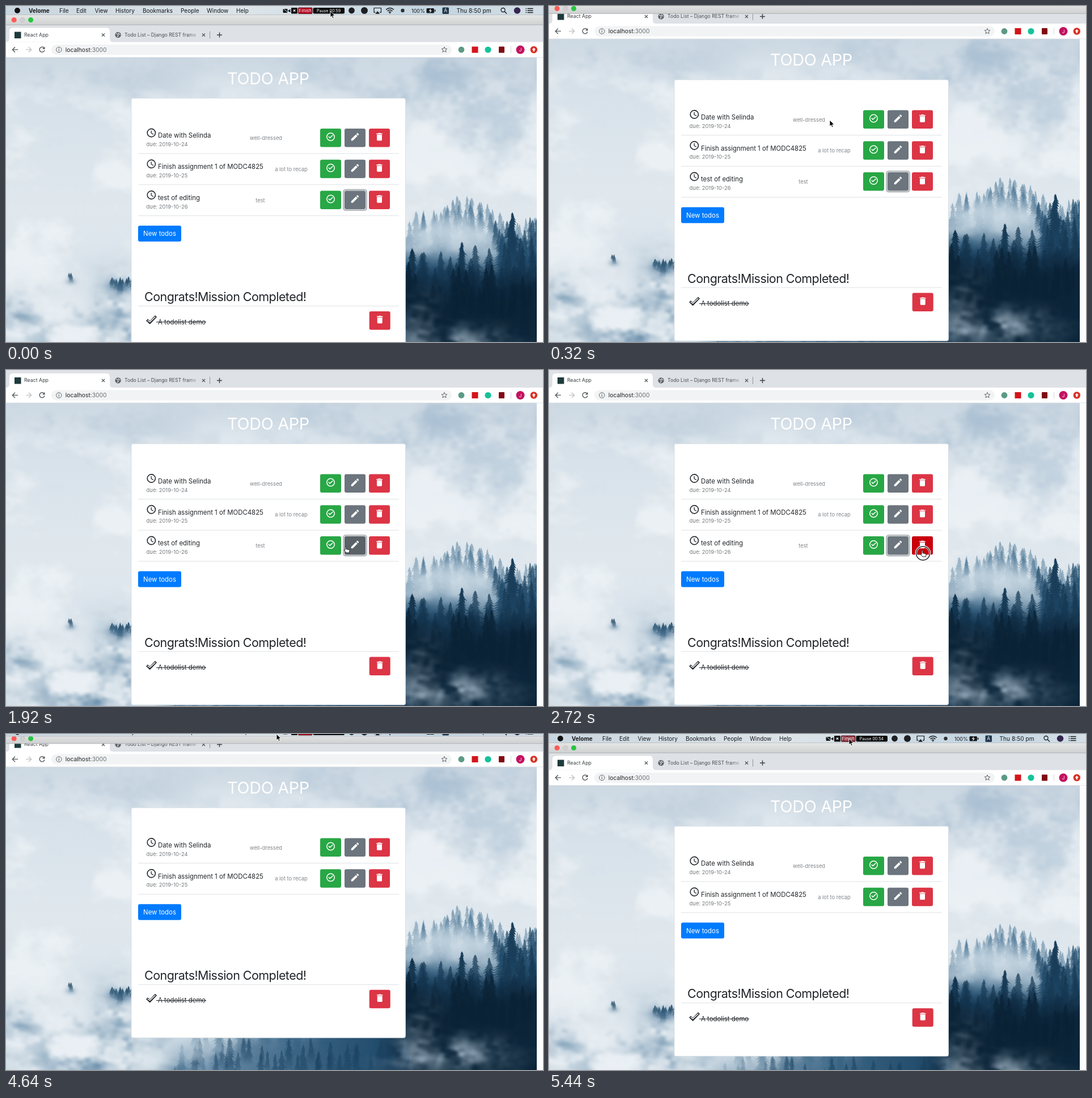
Write an HTML page with a canvas that moves like this. It is 947 px wide and 592 px high and loops after 5600 ms.

```html
<!DOCTYPE html>
<html lang="en">
<head>
<meta charset="utf-8">
<title>Todo app</title>
<style>
  html, body { margin: 0; width: 100%; height: 100%; overflow: hidden; background: #fff; }
  #stage { position: relative; width: 947px; height: 592px; overflow: hidden; background: #dee1e6; }
  #win, #stage svg, canvas { position: absolute; left: 0; top: 0; }
  #win { width: 947px; height: 592px; }
  canvas { top: 58px; }
  svg { display: block; font-family: Inter, "Open Sans", sans-serif; }
  text { white-space: pre; }
</style>
</head>
<body>
<div id="stage">
  <div id="win">
    <canvas id="scene" width="936" height="534"></canvas>
    <svg id="page" width="947" height="592"></svg>
  </div>
  <svg id="top" width="947" height="592"></svg>
</div>
<script>
const $ = id => document.getElementById(id);
const clamp = v => Math.max(0, Math.min(1, v));
const smooth = (v, a, b) => { const k = clamp((v - a) / (b - a)); return k * k * (3 - 2 * k); };

// ---------- misty forest ----------
const W = 936, H = 534, TOP = 58;
const ctx = $('scene').getContext('2d');
let seed = 11;
const rnd = () => (seed = (seed * 16807) % 2147483647) / 2147483647;

const hash = (x, y) => { const v = Math.sin(x * 127.1 + y * 311.7) * 43758.5453; return v - Math.floor(v); };
function noise(x, y) {
  const i = Math.floor(x), j = Math.floor(y);
  const u = smooth(x - i, 0, 1), v = smooth(y - j, 0, 1);
  const a = hash(i, j), b = hash(i + 1, j), c = hash(i, j + 1), d = hash(i + 1, j + 1);
  return a + (b - a) * u + (c - a) * v + (a - b - c + d) * u * v;
}
const fbm = (x, y) => noise(x, y) * .46 + noise(x * 2 + 7, y * 2) * .27 + noise(x * 4, y * 4 + 3) * .16 + noise(x * 9, y * 9) * .11;
const blob = (x, y, cx, cy, rx, ry) => Math.exp(-(((x - cx) / rx) ** 2) - ((y - cy) / ry) ** 2);

// Paints one colour whose alpha comes from alpha(x, y, noise)
function mist(rgb, shift, alpha) {
  const c = document.createElement('canvas');
  c.width = W / 2; c.height = H / 2;
  const g = c.getContext('2d'), img = g.createImageData(c.width, c.height);
  for (let j = 0, p = 0; j < c.height; j++) for (let i = 0; i < c.width; i++, p += 4) {
    const x = i * 2, y = j * 2 + TOP;
    const f = fbm(x / 100 + shift + y / 300, y / 75 - x / 350 + shift);
    img.data.set(rgb, p);
    img.data[p + 3] = 255 * clamp(alpha(x, y, f));
  }
  g.putImageData(img, 0, 0);
  ctx.drawImage(c, 0, TOP, W, H);
}

// A ragged fir that fades into the fog at its foot
function tree(x, y, h, w, rgb, a = 1) {
  const g = ctx.createLinearGradient(0, y, 0, y + h);
  g.addColorStop(0, `rgba(${rgb},${a})`);
  g.addColorStop(.5, `rgba(${rgb},${a * .9})`);
  g.addColorStop(1, `rgba(${rgb},0)`);
  ctx.fillStyle = g;
  ctx.beginPath();
  ctx.moveTo(x, y);
  const n = Math.max(4, Math.round(h / 4.5));
  for (const side of [1, -1]) {
    for (let i = 1; i <= n; i++) {
      const k = side > 0 ? i / n : 1 - (i - 1) / n;
      const r = w * (.04 + k ** .7) * (.45 + rnd() * .75);
      const out = [x + side * r, y + h * k + 1], inn = [x + side * r * .45, y + h * k - 1];
      for (const p of side > 0 ? [out, inn] : [inn, out]) ctx.lineTo(...p);
    }
  }
  ctx.fill();
}

function grove(n, x0, x1, yAt, spread, h, w, rgb, a) {
  for (let i = 0; i < n; i++) {
    const x = x0 + (x1 - x0) * (i + rnd() * 1.6) / n, s = .5 + rnd() * .8;
    tree(x, yAt(x) + (rnd() - .5) * spread, h * s, w * s, rgb, a);
  }
}

const slope = [[0, 640], [220, 585], [320, 500], [600, 400], [705, 330], [936, 325]];
function ridge(x) {
  const i = Math.max(1, slope.findIndex(p => p[0] >= x));
  const [a, b] = [slope[i - 1], slope[i]];
  return a[1] + (b[1] - a[1]) * (x - a[0]) / (b[0] - a[0]);
}
const crest = x => 343 - 36 * Math.exp(-(((x - 812) / 55) ** 2));

function paintScene() {
  ctx.translate(0, -TOP);
  const sky = ctx.createLinearGradient(0, TOP, 0, 592);
  [[0, '#cdd9e3'], [.2, '#d8e2ea'], [.5, '#e0e8ee'], [1, '#d5e0e8']].forEach(s => sky.addColorStop(...s));
  ctx.fillStyle = sky;
  ctx.fillRect(0, TOP, W, H);

  mist([150, 177, 201], 3, (x, y, f) => smooth(f, .38, .72) *
    (.7 * blob(x, y, 740, 100, 230, 65) + .5 * blob(x, y, 90, 95, 170, 60) + .35 * blob(x, y, 880, 220, 110, 60)));
  mist([238, 243, 246], 9, (x, y, f) => smooth(f, .36, .68) * .8 * smooth(y, 60, 170));

  // far slopes
  mist([88, 128, 158], 5, (x, y, f) => smooth(y + (f - .5) * 80, ridge(x) + 15, ridge(x) + 95) * .9);
  grove(26, 700, 936, crest, 22, 62, 13, '92,132,161', .6);
  grove(13, 735, 860, x => crest(x) + 6, 30, 55, 13, '66,109,141', .6);
  mist([30, 72, 104], 15, (x, y, f) => smooth(y + (f - .5) * 90, ridge(x) + 50, ridge(x) + 130) * smooth(x, 300, 700) * .95);
  grove(34, 290, 705, x => ridge(x) + 50, 70, 70, 15, '45,91,124', .5);
  mist([200, 216, 227], 21, (x, y, f) => smooth(f, .3, .65) *
    (.85 * blob(x, y, 760, 362, 85, 30) + .5 * blob(x, y, 845, 385, 40, 40)));

  // near trees
  grove(16, 860, 936, () => 362, 50, 110, 22, '32,74,105', .75);
  tree(893, 331, 120, 24, '24,60,88');
  tree(804, 383, 110, 22, '24,60,88');
  tree(716, 394, 110, 24, '18,50,75');
  grove(26, 700, 936, x => 425 - (x - 705) * .13, 50, 90, 21, '22,57,84', .75);
  mist([10, 34, 54], 27, (x, y, f) => smooth(y + (f - .5) * 70, 405, 480) * smooth(x, 640, 730) * .93);
  grove(30, 700, 936, () => 452, 70, 95, 20, '10,33,52', .75);
  grove(34, 330, 720, () => 548, 36, 60, 13, '24,63,94', .55);

  // low fog
  mist([182, 201, 215], 33, (x, y, f) => smooth(f, .38, .7) *
    (.95 * blob(x, y, 775, 565, 95, 30) + .45 * blob(x, y, 725, 505, 40, 35) + .7 * blob(x, y, 320, 560, 80, 45)));
  mist([62, 108, 144], 37, (x, y, f) => (.35 + f) * (blob(x, y, 201, 463, 20, 9) + .5 * blob(x, y, 113, 452, 9, 6)));
  grove(9, 183, 220, () => 448, 9, 22, 8, '34,74,103', .95);
  grove(3, 109, 118, () => 438, 6, 20, 6, '34,74,103', .95);
  mist([84, 126, 159], 39, (x, y, f) => smooth(f, .36, .66) *
    (.95 * blob(x, y, 205, 510, 60, 60) + .65 * blob(x, y, 25, 505, 90, 35) + .75 * blob(x, y, 140, 575, 110, 35)));
  mist([236, 241, 245], 45, (x, y, f) => smooth(f, .4, .66) *
    (.85 * blob(x, y, 80, 495, 140, 40) + .8 * blob(x, y, 30, 570, 100, 45)));
}

// ---------- svg helpers ----------
const text = (x, y, s, size, fill = '#212529', more = '') =>
  `<text x="${x}" y="${y}" font-size="${size}" fill="${fill}" ${more}>${s}</text>`;
const rect = (x, y, w, h, fill, r = 0, more = '') =>
  `<rect x="${x}" y="${y}" width="${w}" height="${h}" rx="${r}" fill="${fill}" ${more}/>`;
const dot = (x, y, r, fill, more = '') => `<circle cx="${x}" cy="${y}" r="${r}" fill="${fill}" ${more}/>`;
const line = (d, color, w = 1, more = '') => `<path d="${d}" fill="none" stroke="${color}" stroke-width="${w}" ${more}/>`;
const mid = 'text-anchor="middle"';

const glyphs = {
  clock: dot(12, 12, 9, 'none', 'stroke="#212529" stroke-width="2"') + line('M11.8 7v5.6l4.8 2.9', '#212529', 1.6),
  check: dot(12, 12, 9, 'none', 'stroke="#fff" stroke-width="2"') + line('M7 11.3l3.2 3.2L17.200 8', '#fff', 2),
  edit: '<path fill="#fff" d="M3 17.25V21h3.75L17.81 9.94l-3.75-3.75zM20.71 7.04c.39-.39.39-1.02 0-1.41l-2.34-2.34c-.39-.39-1.02-.39-1.41 0l-1.83 1.83 3.75 3.75z"/>',
  trash: '<path fill="#fff" d="M6 19c0 1.1.9 2 2 2h8c1.1 0 2-.9 2-2V7H6zM19 4h-3.5l-1-1h-5l-1 1H5v2h14z"/>'
};
const icon = (name, cx, cy, size) =>
  `<g transform="translate(${cx - size / 2} ${cy - size / 2}) scale(${size / 24})">${glyphs[name]}</g>`;
const button = (x, y, color, name, id = '') =>
  rect(x, y, 37, 32.5, color, 3, id && `id="${id}"`) + icon(name, x + 18.5, y + 14.5, 18);
const rule = y => rect(233, y, 460, 1, '#dee2e6');
const GREEN = '#28a745', GRAY = '#6c757d', RED = '#dc3545';

function row(i, title, due, note, noteX) {
  const y = 183.5 + i * 54.75, last = i === 2;
  return icon('clock', 256.3, y + 7.5, 19) +
    text(268, y + 16.3, title, 11.4) +
    text(247.6, y + 31.2, 'due: ' + due, 9.4, '#75797d') +
    text(noteX, y + 20.2, note, 9.3, '#80858a', mid) +
    (last ? rect(595.2, y - 1.8, 40.6, 36.1, 'none', 4, 'stroke="#b5babe" stroke-width="2.6"') : '') +
    button(554, y, GREEN, 'check', last ? 'done' : '') +
    button(597, y, GRAY, 'edit', last ? 'edit' : '') +
    button(640, y, RED, 'trash', last ? 'trash' : '') +
    rule(y + 43.5);
}

const cross = (x, y, r, color) => line(`M${x - r} ${y - r}l${2 * r} ${2 * r}m0 ${-2 * r}l${-2 * r} ${2 * r}`, color, 1.1);

const tabs = `
  <defs><linearGradient id="fade" gradientUnits="userSpaceOnUse" x1="322" x2="341" y1="0" y2="0">
    <stop stop-color="#4b4f54"/><stop offset="1" stop-color="#4b4f54" stop-opacity="0"/></linearGradient></defs>
  ${rect(0, 0, 947, 31, '#dee1e6')}
  <path fill="#fff" d="M0 31q6 0 6-6V12q0-6 6-6h165q6 0 6 6v13q0 6 6 6z"/>
  ${rect(15, 13, 11.5, 11.5, '#1d3a3c')}
  ${text(32, 21.4, 'React App', 8.8, '#3c4043')}${cross(171.5, 18.4, 2.6, '#4a4d51')}
  ${dot(197.6, 18.4, 5.2, '#5f6368')}
  ${line('M194 16l3 1 1 3-2 2M199 14.500l-.5 2 3 1.500', '#dee1e6', 1.2)}
  ${text(209, 21.4, 'Todo List – Django REST frame', 8.7, 'url(#fade)')}
  ${cross(348.5, 18.4, 2.6, '#4a4d51')}${rect(359, 12, 1, 13, '#92969b')}
  ${line('M376.500 14v9M372 18.500h9', '#3c4043', 1.4)}`;

const toolbar = `
  ${rect(0, 31, 947, 27, '#fff')}${rect(0, 57.5, 947, .8, '#dcdfe2')}
  ${line('M21 44.400h-9.500M16 39.700l-4.700 4.700 4.700 4.700', '#55595d', 1.4)}
  ${line('M35 44.400h9.500M40 39.700l4.700 4.700-4.700 4.700', '#bfc2c5', 1.4)}
  ${line('M67.500 41.800A4.500 4.500 0 1 0 68 45.500', '#55595d', 1.4)}<path d="M68.500 39v4.500H64z" fill="#55595d"/>
  ${rect(80, 35.5, 706, 18, '#f1f3f4', 9)}
  ${dot(93.3, 44.5, 4.7, 'none', 'stroke="#5f6368"')}${line('M93.300 43.600v3.400M93.300 41.500v1.200', '#5f6368', 1.1)}
  <text x="104.800" y="48.100" font-size="10.300" fill="#202124">localhost<tspan fill="#6b6f74">:3000</tspan></text>
  <path d="M773 39.500l1.400 3.200 3.500.3-2.700 2.300.9 3.400-3.100-1.800-3.100 1.800.9-3.400-2.700-2.300 3.500-.3z" fill="none" stroke="#5f6368"/>
  ${dot(803, 44.5, 5.4, '#5c9a86')}${rect(821.5, 39, 11, 11, '#d5141b')}
  ${dot(850, 44.5, 5.6, '#15c39a')}${rect(869, 39, 10, 11, '#800a14', 1)}
  ${rect(890, 38.5, 1, 12, '#d5d8db')}
  ${dot(907, 44.5, 7.5, '#c2125f')}${text(907, 47.5, 'J', 8.2, '#fff', mid)}
  ${dot(930.8, 44.5, 6.2, '#d93025')}<path d="M930.800 41l3.300 3.600h-2v3h-2.600v-3h-2z" fill="#fff"/>`;

$('page').innerHTML = tabs + toolbar + `
  ${rect(936, 58.3, 11, 560, '#fcfcfc')}
  ${text(462.5, 105, 'TODO APP', 28.8, '#fff', mid + ' letter-spacing="-.3"')}
  ${rect(221, 130, 483.5, 460, '#fff', 3, 'id="card" stroke="#d5dbe0" stroke-width=".8"')}
  ${row(0, 'Date with Selinda', '2019-10-24', 'well-dressed', 458.5)}
  ${row(1, 'Finish assignment 1 of MODC4825', '2019-10-25', 'a lot to recap', 503)}
  <g id="third">${row(2, 'test of editing', '2019-10-26', 'test', 448.5)}</g>
  <g id="below">
    ${rect(233, 354.5, 76, 28, '#007bff', 3)}${text(271, 372.8, 'New todos', 11.4, '#fff', mid)}
    ${text(244, 487.6, 'Congrats!Mission Completed!', 21.5, '#212529', 'letter-spacing="-.55"')}${rule(495.6)}
    ${line('M248.500 520.500l5.200 4.800L264.500 514', '#212529', 4.2)}${line('M249.600 521.400l4.100 2.700L263.400 515', '#fff', 1.5)}
    ${text(268, 528.2, 'A todolist demo', 11.4)}${rect(265, 523.8, 88, 1, '#212529')}
    ${button(640.7, 505.5, RED, 'trash')}
  </g>`;

const menus = [[94, 'File'], [124, 'Edit'], [156.5, 'View'], [193, 'History'], [241, 'Bookmarks'], [308, 'People'], [354, 'Window'], [406, 'Help']];
const INK = '#15181b';
const menuBar = `
  <linearGradient id="bar"><stop stop-color="#c9d5de"/><stop offset=".45" stop-color="#dce4e9"/><stop offset=".8" stop-color="#c3d5e1"/><stop offset="1" stop-color="#d3dee6"/></linearGradient>
  ${rect(0, -8, 947, 23.7, 'url(#bar)')}${rect(0, 15.2, 947, .6, '#a9b1b8')}
  ${dot(20, 8, 5, '#111')}
  ${text(40, 11.7, 'Velome', 10, INK, 'font-weight="700"')}
  ${menus.map(([x, s]) => text(x, 11.7, s, 10, INK)).join('')}
  ${rect(488.5, 5, 8, 7, INK, 1)}<path d="M497 8.500l4.500-3v6z" fill="${INK}"/>${line('M488.500 4l11 9.500', '#dce4e9', 1)}
  ${rect(503, 3, 11, 10.5, '#0b0b0b', 1)}${cross(508.5, 8.2, 1.7, '#fff')}
  ${rect(515.5, 3, 24.5, 10.5, '#b3001b', 1, 'id="finish" stroke="#4a0a12" stroke-width=".8"')}
  ${text(527.7, 11.2, 'Finish', 8, '#fff', mid)}
  ${rect(541.5, 3, 55.5, 10.5, '#0b0b0b', 2)}${text(569, 10.9, 'Pause 00:59', 7.1, '#fff', mid + ' id="count"')}
  ${dot(609.5, 8, 5.4, '#1d1f22')}${dot(632, 8, 6, '#1d1f22')}
  ${line('M651.500 11.200h-2.500V3.500h12.500v7.700h-2.500', INK, 1.2)}<path d="M655.200 9l4 4.700h-8z" fill="${INK}"/>
  ${line('M670 6.500q7-6 14 0M672.400 9q4.600-4 9.200 0M674.800 11.200q2.200-2 4.400 0', INK, 1.4)}${dot(677, 12.600, 1, INK)}
  ${dot(699.5, 8, 3.2, '#2c3034')}
  ${text(715, 11.5, '100%', 9, INK)}
  ${rect(741.5, 4, 13.5, 8.5, INK, 1.5)}${rect(755.8, 6.5, 1.6, 3.5, INK)}<path d="M749.500 4l-4 4.800h2.500l-.8 3.700 4-4.800h-2.500z" fill="#dce4e9"/>
  ${rect(769.5, 2.5, 11.5, 11.5, '#23364a', 1.5)}${text(775.2, 11.4, 'A', 8.6, '#dfe8ee', mid)}
  ${text(794.5, 11.7, 'Thu 8:50 pm', 10.2, INK)}
  ${dot(876.5, 7, 3.5, 'none', `stroke="${INK}" stroke-width="1.300"`)}${line('M879 9.500l4 4', INK, 1.5)}
  ${dot(901.5, 8, 5.8, '#34264f')}
  ${line('M919.500 4.500h10M919.500 8h10M919.500 11.500h10', INK, 1.4)}${line('M916.500 4.500h1.500M916.500 8h1.500M916.500 11.500h1.500', INK, 1.4)}`;

const titleBar = `
  <linearGradient id="metal" x2="0" y2="1"><stop stop-color="#e6e6e6"/><stop offset="1" stop-color="#cfd0d1"/></linearGradient>
  ${rect(0, 15.5, 947, 18, 'url(#metal)')}${rect(0, 32.8, 947, 1, '#b0b2b5')}
  ${dot(14.2, 24.5, 4.5, '#fc5b57')}${dot(29, 24.5, 4.2, '#d0d0d0', 'stroke="#bcbcbc" stroke-width=".6"')}${dot(43.6, 24.5, 4.5, '#29c540')}`;

$('top').innerHTML = `<g id="title">${titleBar}</g><g id="menu">${menuBar}</g>
  <g id="ring">${dot(0, 0, 12.2, 'none', 'stroke="#fff" stroke-width="3.400"')}${dot(0, 0, 12, 'none', 'stroke="#26282b" stroke-width="1.500"')}</g>
  <path id="arrow" fill="#000" stroke="#fff" stroke-width=".9" stroke-linejoin="round" d="M0 0v11l2.500-2.300 1.700 3.900 1.900-.8-1.700-3.800H8z"/>
  <path id="hand" fill="#fff" stroke="#111" stroke-width=".9" stroke-linejoin="round" d="M0 1q0-1.200 1-1.200T2 1v3.600l5 1q1.200.4 1 1.800L7.300 11H2L-1.800 6.800q.2-1.400 1.800-.2z"/>`;

// ---------- timeline ----------
const LOOP = 5600;
const path = [
  [0, 572, 9], [160, 541, 84], [320, 495, 201], [800, 509, 182], [960, 527, 207], [1120, 538, 252], [1280, 545, 297],
  [1600, 549, 300], [1760, 566, 305], [1920, 598, 311], [2080, 630, 316], [2240, 650, 318], [2400, 657, 318],
  [3360, 520, 345], [3520, 354, 372], [4000, 372, 322], [4160, 420, 190], [4320, 462, 62], [4480, 477, 4],
  [4640, 477, 0], [4800, 480, 2], [4960, 488, 5], [5120, 500, 8], [5280, 519, 9], [5440, 529, 8]
];
// time, window, title bar and menu bar offsets
const bars = [[0, 32.5, 0, 0], [320, 0, -20, -17], [480, 0, -36, -24], [4480, 0, -30, -20], [4640, 0, -16.5, -11.5], [4800, 32.5, 0, 0]];
const at = (table, t) => table.filter(r => r[0] <= t).pop();
const move = (id, x, y) => $(id).setAttribute('transform', `translate(${x} ${y})`);
const show = (id, on) => $(id).setAttribute('visibility', on ? 'visible' : 'hidden');

function draw(t) {
  const [, x, y] = at(path, t), [, win, title, menu] = at(bars, t);
  $('win').style.transform = `translateY(${win}px)`;
  move('title', 0, title);
  move('menu', 0, menu);

  const gone = t >= 2880;
  const over = gone || y < 293 || y > 325 ? '' : x >= 640 ? 'trash' : x >= 597 && x <= 634 ? 'edit' : x >= 554 && x <= 591 ? 'done' : '';
  $('third').style.display = gone ? 'none' : '';
  move('below', 0, gone ? -54.75 : 0);
  $('card').setAttribute('height', gone ? 405.25 : 460);
  $('done').setAttribute('fill', over === 'done' ? '#218838' : GREEN);
  $('edit').setAttribute('fill', over === 'edit' ? '#5a6268' : GRAY);
  $('trash').setAttribute('fill', over === 'trash' ? '#c8000c' : RED);

  const pressing = t >= 2720 && t < 2880;
  show('ring', pressing);
  show('hand', over);
  show('arrow', !over);
  move('ring', 659.5, 323);
  move('hand', x, y);
  move('arrow', x, y);
  $('finish').setAttribute('fill', t >= 5280 ? '#8c2f3b' : '#b3001b');
  $('count').textContent = t < 4480 ? 'Pause 00:59' : t < 4960 ? 'Pause 00:55' : 'Pause 00:54';
}

paintScene();
draw(0);
const start = performance.now();
(function tick() {
  draw((performance.now() - start) % LOOP);
  requestAnimationFrame(tick);
})();
</script>
</body>
</html>
```
